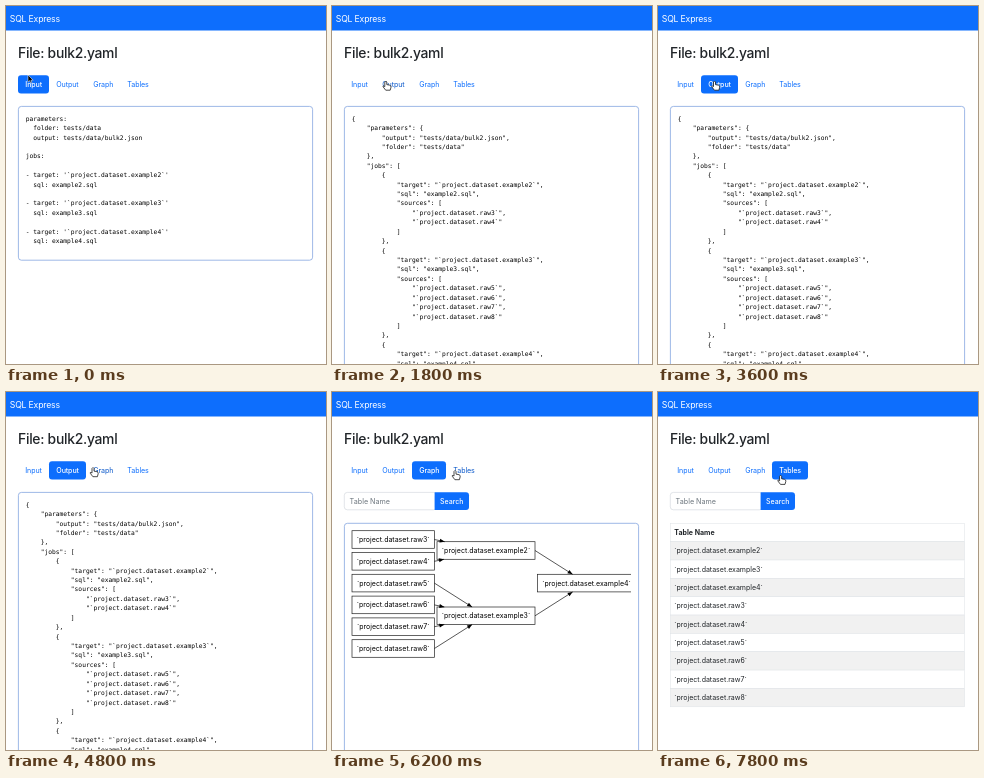
Recreate the animation shown at these times as an HTML page. Size 320 by 358 pixels, loop 8.1 s.

```html
<!DOCTYPE html>
<html lang="en">
<head>
<meta charset="utf-8">
<title>SQL Express</title>
<style>
  html, body { margin: 0; width: 100%; height: 100%; overflow: hidden; background: #fff; }
  svg { display: block; width: 320px; height: 358px; font: 7px Inter, sans-serif; }
  .brand { font-size: 8.7px; letter-spacing: -.2px; }
  .title { font-size: 13.9px; font-weight: 500; letter-spacing: -.28px; }
  .nav { font-size: 7.1px; letter-spacing: -.1px; }
  .code { font: 6.26px "DejaVu Sans Mono", monospace; white-space: pre; }
  .panel { fill: #fff; stroke: #86a6e0; stroke-width: .8; }
  .node { fill: #fff; stroke: #222; stroke-width: .7; }
  .edge { stroke: #111; stroke-width: .7; }
</style>
</head>
<body>
<svg id="stage" viewBox="0 0 320 358"></svg>
<script>
const BLUE = '#0d6efd', LOOP = 8100, STEP = 100;
const stage = document.getElementById('stage');

const escapeText = s => s.replace(/&/g, '&amp;').replace(/</g, '&lt;');
const text = (x, y, s, attrs = '') => `<text x="${x}" y="${y}" ${attrs}>${escapeText(s)}</text>`;
const rect = (x, y, w, h, attrs = '') => `<rect x="${x}" y="${y}" width="${w}" height="${h}" ${attrs}/>`;
const panel = (y, h) => rect(12.4, y, 294.2, h, 'rx="3" class="panel"');
const code = listing => listing.split('\n').slice(0, 28)
  .map((line, i) => text(19.7, 114.7 + i * 9.42, line, 'class="code"')).join('');

// Job data behind all four pages
const table = name => '`project.dataset.' + name + '`';
const inputs = {
  example2: ['raw3', 'raw4'],
  example3: ['raw5', 'raw6', 'raw7', 'raw8'],
  example4: ['example2', 'example3']
};
const jobNames = Object.keys(inputs);
const raws = [...inputs.example2, ...inputs.example3];

function inputPage() {
  const jobs = jobNames.map(n => "\n- target: '" + table(n) + "'\n  sql: " + n + '.sql\n').join('');
  return panel(100.4, 153.8) +
    code('parameters:\n  folder: tests/data\n  output: tests/data/bulk2.json\n\njobs:\n' + jobs);
}

function outputPage() {
  const jobs = jobNames.map(n => ({ 'target': table(n), 'sql': n + '.sql', 'sources': inputs[n].map(table) }));
  const parameters = { output: 'tests/data/bulk2.json', folder: 'tests/data' };
  return panel(100.4, 300) + code(JSON.stringify({ parameters, jobs }, null, 4));
}

const searchBar =
  rect(12.3, 100.4, 92, 17.4, 'rx="3" fill="#fff" stroke="#ced4da" stroke-width=".6"') +
  text(17.6, 111.6, 'Table Name', 'fill="#6c757d" font-size="7.2"') +
  `<path d="M102.6 100.2H134a3 3 0 0 1 3 3v11.8a3 3 0 0 1-3 3h-31.4z" fill="${BLUE}"/>` +
  text(119.8, 111.6, 'Search', 'fill="#fff" font-weight="500" text-anchor="middle"');

function graphPage() {
  const nodes = { example2: [154, 158.5, 98], example3: [154, 223.8, 98], example4: [254.5, 191.1, 98] };
  raws.forEach((n, i) => nodes[n] = [61.2, 147.5 + i * 21.8, 82.4]);
  const half = 8.8;
  let edges = '', boxes = '';
  for (const job of jobNames) for (const input of inputs[job]) {
    // Runs from the right side of the input towards the job's centre, up to its border
    const [inX, inY, inW] = nodes[input], [jobX, jobY] = nodes[job];
    const x = inX + inW / 2, dx = jobX - x, dy = jobY - inY, k = 1 - half / Math.abs(dy);
    const angle = Math.atan2(dy, dx) * 180 / Math.PI;
    const endX = x + dx * k, endY = inY + dy * k;
    edges += `<line x1="${x}" y1="${inY}" x2="${endX}" y2="${endY}" class="edge"/>` +
      `<path d="M0 0L-5-2V2z" transform="translate(${endX} ${endY}) rotate(${angle})"/>`;
  }
  for (const [name, [x, y, w]] of Object.entries(nodes))
    boxes += rect(x - w / 2, y - half, w, half * 2, 'class="node"') +
      text(x, y + 2.5, table(name), 'text-anchor="middle"');
  return searchBar + panel(131.3, 300) +
    `<clipPath id="view">${rect(13, 132, 286, 226)}</clipPath><g clip-path="url(#view)">${boxes}${edges}</g>`;
}

function tablesPage() {
  const rowHeight = 18.35, top = 131.3;
  const rows = ['Table Name', ...jobNames.map(table), ...raws.map(table)].map((label, i) => {
    const y = top + i * rowHeight;
    return rect(12.4, y, 294.2, rowHeight,
      `fill="${i % 2 ? '#f1f1f1' : '#fff'}" stroke="#dee2e6" stroke-width=".5"`) +
      text(16.3, y + 11.6, label, i ? 'fill="#212529"' : 'font-weight="700" fill="#212529"');
  });
  return searchBar + rows.join('');
}

const tabs = [
  { label: 'Input', x: 12, w: 31, start: -1000, page: inputPage },
  { label: 'Output', x: 43, w: 37, start: 1800, page: outputPage },
  { label: 'Graph', x: 80, w: 34, start: 4900, page: graphPage },
  { label: 'Tables', x: 114, w: 36, start: 7100, page: tablesPage }
];

stage.innerHTML =
  rect(0, 0, 320, 24.5, `fill="${BLUE}"`) +
  text(3.8, 15.9, 'SQL Express', 'class="brand" fill="#fff"') +
  text(12, 52, 'File: bulk2.yaml', 'class="title" fill="#212529"') +
  tabs.map(tab => `<g class="page">${tab.page()}</g>`).join('') +
  tabs.map(tab => rect(tab.x, 69.2, tab.w, 18.2, `rx="3" fill="${BLUE}" class="pill"`) +
    text(tab.x + 7.3, 80.9, tab.label, 'class="nav"')).join('') +
  `<path id="arrow" d="M0 0v7.2l1.7-1.6 1.1 2.5 1.2-.5-1.1-2.4h2.3z" stroke="#fff" stroke-width=".5"/>
   <path id="hand" d="M-1 1q1-2 2 0v2.6l3 .6q1.5.4 1.2 2l-.8 3h-4.5l-2.6-3.4q-.4-1.2.9-.8l.8.6z"
     fill="#fff" stroke="#111" stroke-width=".75"/>`;

const pages = stage.querySelectorAll('.page');
const pills = stage.querySelectorAll('.pill');
const labels = stage.querySelectorAll('.nav');
const arrow = document.getElementById('arrow'), hand = document.getElementById('hand');

// Pointer moves: start, end, destination, lift of the arc
const moves = [
  [300, 900, 43, 79, 0],
  [1300, 1600, 53.8, 75, 0],
  [3500, 3600, 56.5, 75, 0],
  [3600, 4100, 87, 75.5, 13],
  [5400, 6200, 123, 78.5, 0],
  [6300, 6900, 122.6, 83.2, 0]
];

function pointer(time) {
  let x = 22, y = 69;
  for (const [from, to, endX, endY, lift] of moves) {
    if (time <= from) break;
    const p = Math.min(1, (time - from) / (to - from)), e = p * p * (3 - 2 * p);
    x += (endX - x) * e;
    y += (endY - y) * e - lift * Math.sin(Math.PI * e);
  }
  return [x, y];
}

function draw(now) {
  const time = Math.floor(now % LOOP / STEP) * STEP;
  const active = tabs.findLastIndex(tab => time >= tab.start);
  const fade = Math.min(1, (time - tabs[active].start) / 200);
  const [x, y] = pointer(time);
  const overTabs = y > 69.2 && y < 87.4;
  tabs.forEach((tab, i) => {
    const on = i === active, hover = overTabs && x >= tab.x && x < tab.x + tab.w;
    pages[i].style.display = on ? '' : 'none';
    pills[i].style.opacity = on ? fade : 0;
    labels[i].style.fill = on && fade > 0 ? '#fff' : hover ? '#0a58ca' : BLUE;
    labels[i].style.fontWeight = on && fade > 0 ? 500 : 400;
  });
  for (const cursor of [arrow, hand]) cursor.setAttribute('transform', `translate(${x} ${y})`);
  arrow.style.display = overTabs ? 'none' : '';
  hand.style.display = overTabs ? '' : 'none';
}

const begin = performance.now();
(function tick() {
  draw(performance.now() - begin);
  requestAnimationFrame(tick);
})();
</script>
</body>
</html>
```
